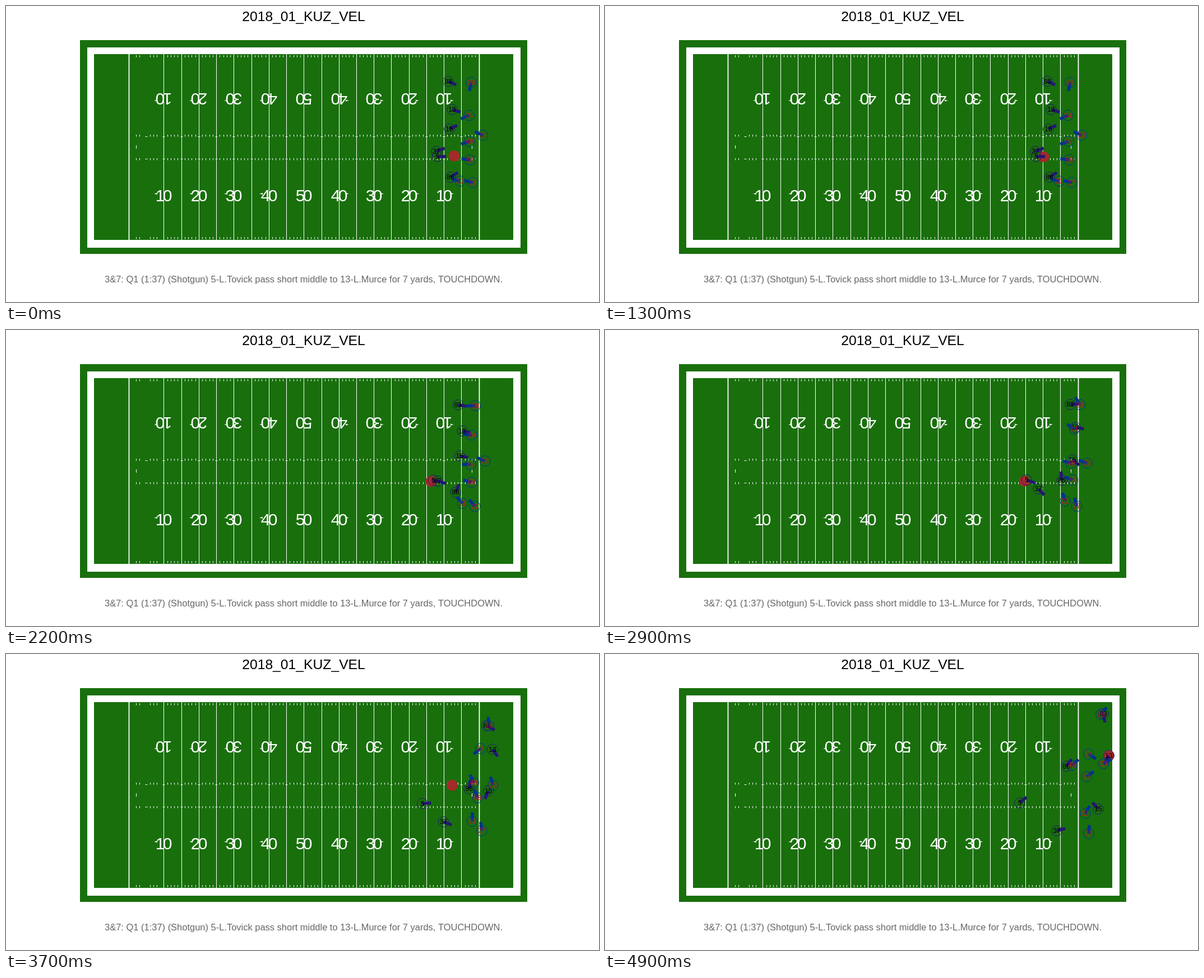
An HTML page with a canvas that plays this animation: 1058x529 px, repeating every 5000 ms.

```html
<!DOCTYPE html>
<html lang="en">
<head>
<meta charset="utf-8">
<title>Play animation</title>
<style>
html, body { margin: 0; width: 100%; height: 100%; overflow: hidden; background: #fff; }
canvas { display: block; }
</style>
</head>
<body>
<canvas id="stage" width="1058" height="529"></canvas>
<script>
const ctx = document.getElementById('stage').getContext('2d');
const FONT = '"Liberation Sans", Arial, sans-serif';
const GREEN = '#196f0c';
const HOME = { line: '#241773', text: '#000' };
const AWAY = { line: '#00338d', text: '#c60c30' };
const LOOP = 5000, STEP = 100;
const CX = 531.3, CY = 252.3, YARD = 6.245;

// Key moments of the play, in ms
const SNAP = 1100, START = 1300, IN_HAND = 1500, BREAK = 2900, THROW = 3300, CATCH = 4390, END = 4900;
const BALL_SPOT = [799.5, 268];
const PICKUP = 1.5;

const players = [];

// Start, break and end of a route, each as [x, y, facing in degrees]
function player(number, team, start, turn, end) {
  const p = { number, team, start, turn, end };
  players.push(p);
  return p;
}

player(83, HOME, [789, 134.5, 25], [830, 133, -4], [889, 107, 79]);
const receiver = player(13, HOME, [796, 185, 17], [839, 174, 10], [899, 181.5, 120]);
player(15, HOME, [791, 220, -26], [834, 232, 37], [880, 277, 228]);
player(37, HOME, [768, 260, -22], [773, 284, 45], [806, 316, -15]);
const passer = player(5, HOME, [769.5, 269, 0], [752.5, 268, 20], [740, 266, -40]);
player(86, HOME, [793, 306, -33], [815, 268.5, -96], [823, 200.5, -53]);
player(28, AWAY, [830, 136.5, 102], [847.5, 133.5, 238], [885, 107.5, 309]);
player(24, AWAY, [826, 195.5, 156], [837.5, 177, 213], [863, 178.5, 35]);
player(23, AWAY, [850.5, 231, 205], [860, 238, 200], [889.5, 196, 330]);
player(49, AWAY, [827, 242, 162], [832, 238, 195], [833, 199, 318]);
player(58, AWAY, [828, 275, 188], [834.5, 268, 199], [859, 219, 325]);
player(21, AWAY, [810, 313, 195], [821, 305.5, 252], [857, 285, 300]);
player(27, AWAY, [833, 315.5, 194], [841.5, 315, 256], [863, 321, 274]);

const mix = (a, b, u) => a + (b - a) * u;
const progress = (from, to, t) => Math.min(1, Math.max(0, (t - from) / (to - from)));

// Speeds up from rest, then bends away from the break at the same velocity.
function run(a, b, c, t) {
  if (t < BREAK) return mix(a, b, progress(START, BREAK, t) ** PICKUP);
  const u = progress(BREAK, END, t);
  const carry = PICKUP * (b - a) * (END - BREAK) / (BREAK - START);
  return b + carry * u + (c - b - carry) * u * u;
}

function pose({ start, turn, end }, t) {
  const [x, y] = [0, 1].map(i => run(start[i], turn[i], end[i], t));
  const facing = t < BREAK
    ? mix(start[2], turn[2], progress(START, BREAK, t))
    : mix(turn[2], end[2], progress(BREAK, END, t));
  return { x, y, angle: facing * Math.PI / 180 };
}

function held(t) {
  const { x, y } = pose(passer, t);
  return [x - 4, y + 2];
}

function ballAt(t) {
  const caught = pose(receiver, Math.max(t, CATCH));
  const [from, to, u] = t < THROW
    ? [BALL_SPOT, held(t), progress(SNAP, IN_HAND, t)]
    : [held(THROW), [caught.x, caught.y], progress(THROW, CATCH, t)];
  return [0, 1].map(i => mix(from[i], to[i], u));
}

const yardX = yard => Math.round(CX + (yard - 60) * YARD) + 0.5;

function line(x1, y1, x2, y2, width = 1, color = '#fff') {
  ctx.strokeStyle = color;
  ctx.lineWidth = width;
  ctx.beginPath();
  ctx.moveTo(x1, y1);
  ctx.lineTo(x2, y2);
  ctx.stroke();
}

function box(x, y, w, h, color) {
  ctx.fillStyle = color;
  ctx.fillRect(x, y, w, h);
}

function circle(x, y, r) {
  ctx.beginPath();
  ctx.arc(x, y, r, 0, 2 * Math.PI);
}

function text(label, x, y, size, color) {
  ctx.font = `${size}px ${FONT}`;
  ctx.textAlign = 'center';
  ctx.fillStyle = color;
  ctx.fillText(label, x, y);
}

function yardNumber(yard) {
  const value = String(50 - Math.abs(yard - 60));
  const side = Math.sign(yard - 60);
  const x = yardX(yard);
  for (const turn of [1, -1]) {
    ctx.save();
    ctx.translate(x, CY + turn * 86);
    ctx.scale(turn, turn);
    text(value[0], -6.5, 10.7, 30, '#fff');
    text(value[1], 6.5, 10.7, 30, '#fff');
    ctx.restore();
    // Arrow towards the nearer goal
    if (side) {
      const y = CY + turn * 83.3;
      ctx.fillStyle = '#fff';
      ctx.beginPath();
      ctx.moveTo(x + side * 17.5, y);
      ctx.lineTo(x + side * 11.5, y - 1.5);
      ctx.lineTo(x + side * 11.5, y + 1.5);
      ctx.fill();
    }
  }
}

function field() {
  box(0, 0, 1058, 529, '#fff');
  box(132, 61, 798, 382, GREEN);
  box(145, 74, 773, 358, '#fff');
  box(157, 86, 748, 332, GREEN);

  for (const yard of [10, 110]) line(yardX(yard), 86, yardX(yard), 418, 1.8);
  for (let yard = 20; yard <= 105; yard += 5) line(yardX(yard), 86, yardX(yard), 418);

  for (let yard = 12; yard < 110; yard++) {
    const x = yardX(yard);
    if (yard % 5 === 0) {
      for (const y of [233.5, 273.5]) line(x - 2, y, x + 2, y);
    } else if (yard !== 14 && yard !== 19) {
      for (const y of [88, 230, 272, 413]) line(x, y, x, y + 3.5);
    }
  }
  for (const yard of [12, 108]) line(yardX(yard), 249, yardX(yard), 255);
  for (let yard = 20; yard <= 100; yard += 10) yardNumber(yard);

  text('2018_01_KUZ_VEL', 531, 26.5, 24.7, '#000');
  text('3&7: Q1 (1:37) (Shotgun) 5-L.Tovick pass short middle to 13-L.Murce for 7 yards, TOUCHDOWN.',
    531, 494, 16.48, '#666');
}

function draw(t) {
  field();
  circle(...ballAt(t), 9.8);
  ctx.fillStyle = '#a52a2a';
  ctx.fill();

  const poses = players.map(p => ({ ...p, ...pose(p, t) }));
  for (const p of poses) {
    circle(p.x, p.y, 9.3);
    ctx.strokeStyle = p.team.line;
    ctx.lineWidth = 1;
    ctx.stroke();
  }
  for (const p of poses) {
    line(p.x, p.y, p.x + 15.6 * Math.cos(p.angle), p.y + 15.6 * Math.sin(p.angle), 5.5, p.team.line);
  }
  for (const p of poses) text(p.number, p.x, p.y + 4.3, 12, p.team.text);
}

function tick(now) {
  draw(Math.floor(now % LOOP / STEP) * STEP);
  requestAnimationFrame(tick);
}
tick(performance.now());
</script>
</body>
</html>
```
